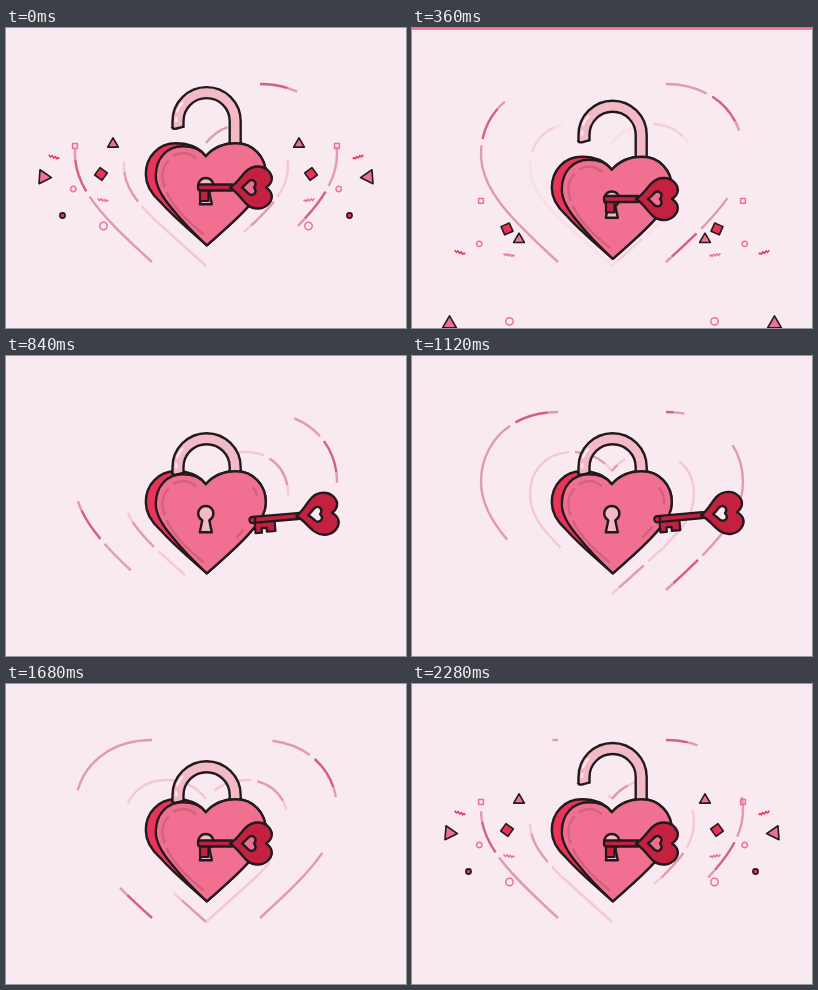
An HTML page with a canvas for the animation above (2.32 s loop, 400 px wide and 300 px high).

```html
<!DOCTYPE html>
<html lang="en">
<head>
<meta charset="utf-8">
<title>Heart lock</title>
<style>
html, body { margin: 0; width: 100%; height: 100%; overflow: hidden; background: #f9e9f0; }
canvas { display: block; width: 400px; height: 300px; }
</style>
</head>
<body>
<canvas id="stage"></canvas>
<script>
const LOOP = 2320, WIPE = 351;
const INK = '#211a1d', BG = '#f9e9f0', PINK = '#f17092', RED = '#e9345a',
  WINE = '#c4203f', PALE = '#f4b9c6', SHADE = '#d2607f',
  DUSK = '#e29aac', DEEP = '#d4607c', FAINT = '#f5c8d5';

const canvas = document.getElementById('stage');
const ctx = canvas.getContext('2d');
const dpr = window.devicePixelRatio || 1;
canvas.width = 400 * dpr;
canvas.height = 300 * dpr;

const clamp = x => Math.max(0, Math.min(1, x));
const out = (x, n) => 1 - Math.pow(1 - clamp(x), n);
const inOut = x => (1 - Math.cos(Math.PI * clamp(x))) / 2;
const fall = dt => dt > 0 ? .0033 * dt * dt : 0;

function curve(d) {
  const el = document.createElementNS('http://www.w3.org/2000/svg', 'path');
  el.setAttribute('d', d);
  return { path: new Path2D(d), len: el.getTotalLength() };
}

function paint(path, fill, stroke, width = 2.4, rule = 'nonzero') {
  if (fill) { ctx.fillStyle = fill; ctx.fill(path, rule); }
  if (stroke) { ctx.strokeStyle = stroke; ctx.lineWidth = width; ctx.stroke(path); }
}

function group(x, y, angle, draw) {
  ctx.save();
  ctx.translate(x, y);
  ctx.rotate(angle * Math.PI / 180);
  draw();
  ctx.restore();
}

function mirror(draw) {
  ctx.save();
  ctx.translate(400, 0);
  ctx.scale(-1, 1);
  draw();
  ctx.restore();
}

// ---- strands running along the heart outlines ----
const outer = curve('M146 56C100 56 69 86 69 126C69 162 100 192 146 234');
const inner = curve('M200 115C190 102 176 96 160 96C135 96 118 114 118 138C118 160 132 175 150 193L200 238');
const SPEED = .0006;

function trim(c, a, b, color) {
  a = clamp(a); b = clamp(b);
  if (b - a < .005) return;
  ctx.save();
  ctx.setLineDash([(b - a) * c.len, 9999]);
  ctx.lineDashOffset = -a * c.len;
  paint(c.path, null, color);
  ctx.restore();
}

// A strand grows from `start`, its tail leaves at `leave`; there is a gap behind its head
function strand(u, up, start, leave = Infinity, rush = 1) {
  const head = (u - start) * SPEED * rush, tail = Math.max(0, (u - leave) * SPEED);
  const piece = (c, a, b, color) => {
    a = Math.max(a, tail);
    if (b > a) up ? trim(c, 1 - b, 1 - a, color) : trim(c, a, b, color);
  };
  for (const [c, base, accent] of [[outer, DUSK, DEEP], [inner, FAINT, DUSK]]) {
    ctx.globalAlpha = c === inner ? 1 - .7 * clamp((u - LOOP) / 360) : 1;
    piece(c, 0, head - .2, base);
    piece(c, head - .175, head - .04, accent);
    piece(c, head - .04, head, base);
  }
  ctx.globalAlpha = 1;
}

function outlines(u) {
  strand(u, true, 600, 650, 3.2);
  strand(u, true, 1390);
  mirror(() => {
    strand(u, false, 600, 610, 3.2);
    strand(u, false, 1000, 1600);
    strand(u, false, 2070);
  });
}

// ---- confetti ----
const tri = r => new Path2D(`M${r} 0L${-r * .5} ${r * .87}L${-r * .5} ${-r * .87}Z`);
const box = s => { const p = new Path2D(); p.rect(-s / 2, -s / 2, s, s); return p; };
const disc = r => { const p = new Path2D(); p.arc(0, 0, r, 0, 7); return p; };
const zigzag = new Path2D('M-5.5 -1.5L-3.5 .5L-2 -1.2L-.3 1L1.2 -.7L2.8 1.5L4 0L5.5 1.2');

const solid = (shape, fill) => () => paint(shape, fill, INK, 1.6);
const line = (shape, color) => () => paint(shape, null, color, 1.5);
const bit = (x, y, rank, draw, angle = 0, spin = 0) => ({ x, y, rank, draw, angle, spin });

// Lower rank leaves and falls first
const bits = [
  bit(37.5, 149, 0, solid(tri(8), PINK), 4, -.64),
  bit(56.5, 187.5, 0, solid(disc(2.6), RED)),
  bit(107, 116, 1, solid(tri(6.2), PINK), -90),
  bit(97.5, 198, 1, line(disc(3.7), PINK)),
  bit(48, 129, 1, line(zigzag, RED), 8),
  bit(95, 146, 2, solid(box(9), RED), 36, -1.1),
  bit(69, 118, 2, line(box(4.8), PINK)),
  bit(67.3, 161, 2, line(disc(2.7), PINK)),
  bit(97, 172, 2, line(zigzag, PINK))
];

function confetti(u) {
  for (const b of bits) {
    const start = 1725 + 33 * b.rank;
    if (u < start) continue;
    const p = out((u - start) / 500, 4), drop = fall(u - 2470 - 41 * b.rank);
    const draw = () => group(200 + (b.x - 200) * p, 150 + (b.y - 150) * p + drop,
      b.angle + b.spin * drop, b.draw);
    draw();
    mirror(draw);
  }
}

// ---- rays ----
function rays(u, start) {
  const p = (u - start) / 200;
  if (p <= 0 || p >= 1) return;
  const a = 60 + 32 * out(p, 1.9), b = 60 + 32 * out(p, 5);
  const fan = () => {
    for (let i = 0; i < 5; i++) {
      group(200, 160, 231 - 30 * i, () => paint(new Path2D(`M${a} 0H${b}`), null, WINE, 1.9));
    }
  };
  fan();
  mirror(fan);
}

// ---- lock ----
const lobe = 'C207 121 217 116 230 116C247 116 260 129 260 147C260 157 256 165 247 174C235 189 218 203 201 218Z';
const back = new Path2D('M201 218C185 204 167 189 154 174C144 165 140 157 140 147C140 129 153 116 170 116C183 116 194 121 200 129' + lobe);
const front = new Path2D('M201 218C189 207 177 195 166 181C154 167 150 158 150 149C150 131 161 119 177 119C187 119 195 122 200 129' + lobe);
const gloss = new Path2D('M190 131C184 125 174 124 167 129M163 133C156 139 155 150 159 160M161 165C168 181 184 196 198 207');
const edge = curve('M247 132C256 143 253 157 244 168L228 185');
const hole = new Path2D('M196.5 165A7.6 7.6 0 1 1 203.5 165L206 177L194 177Z');
const bar = new Path2D('M172.2 118.5V112A28.6 28.6 0 0 1 229.4 112V150');
const shine = new Path2D('M170.5 113V108M171 103A31 31 0 0 1 177 93');
const cap = new Path2D('M166 117.5Q167 120 170 119.5L178 117.3');

// Springs open by 18 px
function lift(u) {
  const dt = Math.max(0, u - 1700);
  return 18 * (Math.exp(-dt / 141) * Math.cos(Math.PI * dt / 180) - 1);
}

function lock(u) {
  paint(back, RED, INK);
  group(0, lift(u), 0, () => {
    paint(bar, null, INK, 13.4);
    paint(bar, null, PALE, 8.6);
    paint(shine, null, '#fdeef3', 2);
    paint(cap, null, INK);
  });
  paint(front, PINK, INK);
  paint(gloss, null, SHADE);
  if (u < 1280) {
    const grow = clamp((u - 560) / 560);
    trim(edge, 0, .3 * grow, SHADE);
    trim(edge, .84 - .14 * grow, .94, SHADE);
  }
  paint(hole, PALE, INK);
}

// ---- key ----
const bow = new Path2D('M-21 0C-13 -5 -10 -12 -4 -17C3 -23 13 -22 18 -16C23 -10 21 -4 15 0' +
  'C21 4 23 10 18 16C13 22 3 23 -4 17C-10 12 -13 5 -21 0Z' +
  'M-9 0C-6 -2 -4 -5 -2 -6.5C2 -9 7 -5 3 0C7 5 2 9 -2 6.5C-4 5 -6 2 -9 0Z');
const teeth = new Path2D('M-63 2V13.5H-56.5V9H-51.5V13H-43V2Z');
const single = new Path2D('M-51 2V13.5H-42.5V2Z');

function key(u) {
  if (u < 480) return;
  const glide = out((u - 480) / 640, 5.6), push = inOut((u - 1120) / 180);
  const end = -67 + 14 * push;
  group(429 - 119 * glide - 65 * push, 244 - 86.5 * glide + 2 * push, -5 * (1 - push), () => {
    paint(push > .5 ? single : teeth, WINE, INK, 2.2);
    const shaft = new Path2D();
    shaft.roundRect(end, -3, -end - 17, 6, 2.5);
    paint(shaft, WINE, INK, 2.3);
    if (push < .5) group(end + 2, 0, 0, () => paint(disc(3), WINE, INK, 2));
    paint(bow, WINE, INK, 2.4, 'evenodd');
  });
}

function scene(u, dy = 0) {
  outlines(u);
  rays(u, 520);
  rays(u, 1760);
  confetti(u);
  group(-.2, dy - .7 + fall(u - 2617), 0, () => lock(u));
  group(0, fall(u - 2622), 0, () => key(u));
}

function band(color, h) {
  ctx.fillStyle = color;
  ctx.fillRect(0, 0, 400, h);
}

function render(t) {
  ctx.setTransform(dpr, 0, 0, dpr, 0, 0);
  ctx.lineJoin = 'round';
  band(BG, 300);
  if (t >= 560) return scene(t);
  scene(t + LOOP);
  if (t < WIPE) return;
  band(PINK, 300 * clamp((t - WIPE) / 130) ** 2);
  if (t < 420) return;
  band(BG, 300 * clamp((t - 420) / 110) ** 2);
  scene(t, -240 * (1 - out((t - 420) / 130, 2)));
}

function tick() {
  render(performance.now() % LOOP);
  requestAnimationFrame(tick);
}
tick();
</script>
</body>
</html>
```
